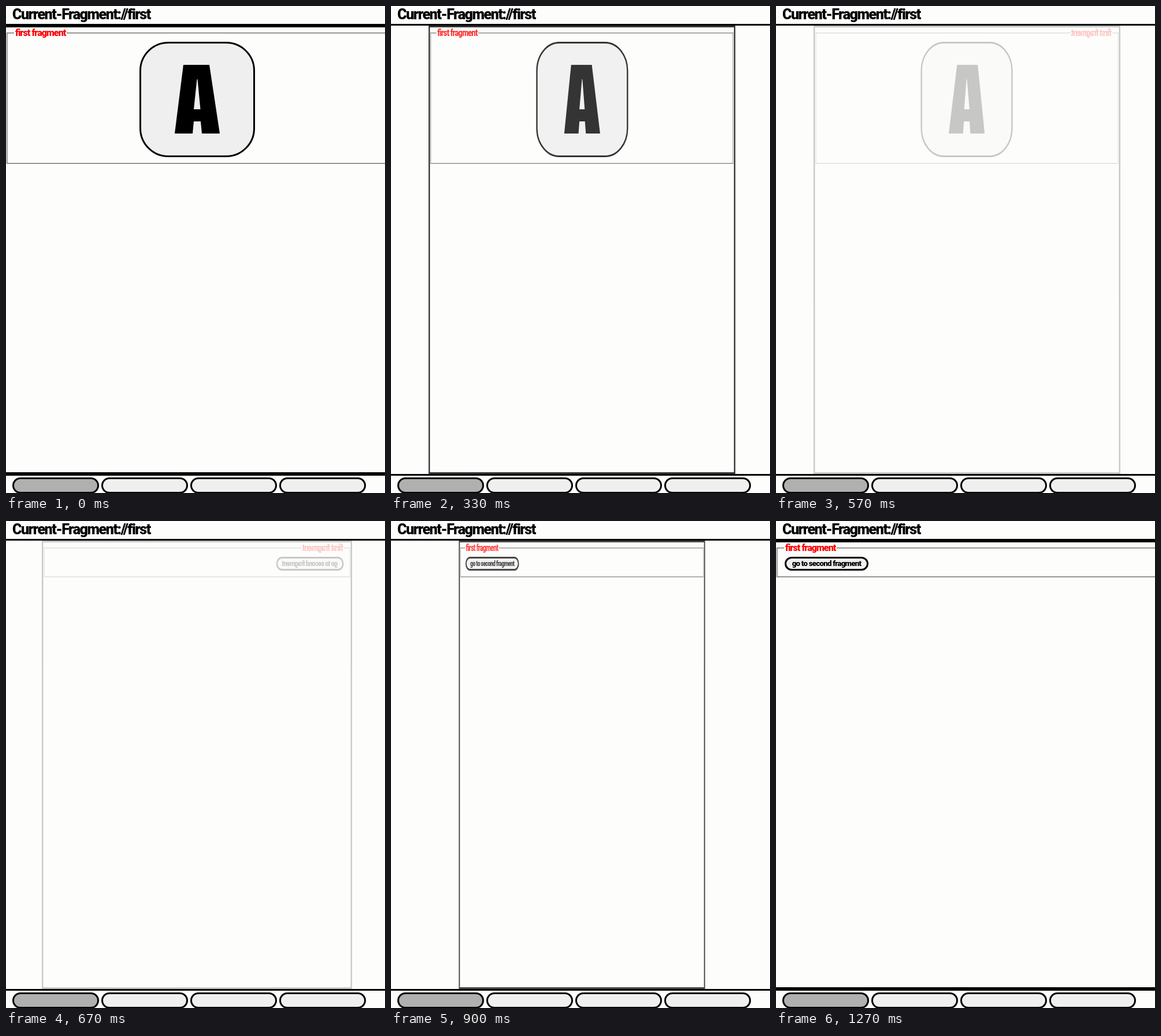
These frames come from a looping animation (656x844 px, 1.66 s). An HTML page:

```html
<!DOCTYPE html>
<html lang="en">
<head>
<meta charset="utf-8">
<title>Fragments</title>
<style>
  html, body { margin: 0; width: 100%; height: 100%; overflow: hidden; }
  body { position: relative; background: #fdfdfc; color: #000;
         font: 900 25px Roboto, sans-serif; white-space: nowrap; }
  div, svg { position: absolute; box-sizing: border-box; letter-spacing: -.058em; }
  .title { left: 11px; top: 0; line-height: 29px; }
  .line { left: 0; width: 100%; height: 3px; background: #000; }
  .button { border: 3px solid #000; background: #efefef; }
  .nav { top: 817px; width: 150px; height: 28px; border-radius: 14px; }
  .nav.on { background: #b0b0b0; }
  #card { left: -3px; top: 34px; width: 667px; height: 777px; border: 3px solid #000; }
  .field { left: 1px; top: 9px; width: 659px; border: 2px groove #c0c0c0; }
  .legend { left: 14px; top: 2px; padding: 0 2px; background: #fdfdfc; color: #f00;
            font-size: 16px; line-height: 16px; }
  .letter { left: 231px; top: 25px; width: 200px; height: 200px; border-radius: 50px; }
  .letter svg { left: -3px; top: -3px; }
  .go { left: 15px; top: 25px; width: 145px; height: 24px; border-radius: 12px;
        font-size: 13.33px; line-height: 18px; text-align: center; }
</style>
</head>
<body>
<div class="title">Current-Fragment://first</div>
<div class="line" style="top:31px"></div>
<div id="card">
  <div class="field" id="field"></div>
  <div class="legend">first fragment</div>
  <div class="button letter" id="letter">
    <svg width="200" height="200" role="img" aria-label="A">
      <path fill-rule="evenodd" d="M76 40H121L139 159H108L106 138H94L92 159H61ZM99.5 65L94 117H105.5L100.5 65Z"/>
    </svg>
  </div>
  <div class="button go" id="go">go to second fragment</div>
</div>
<div class="line" style="top:811px"></div>
<div class="button nav on" style="left:11px"></div>
<div class="button nav" style="left:165px"></div>
<div class="button nav" style="left:319px"></div>
<div class="button nav" style="left:473px"></div>
<script>
const LOOP = 1660, START = 34, OUT = 834, SWAP = 595, BACK = 518;
const [card, field, letter, go] = ['card', 'field', 'letter', 'go'].map(id => document.getElementById(id));

function easeInOut(p, power) {
  p = Math.min(1, Math.max(0, p));
  return p < .5 ? (2 * p) ** power / 2 : 1 - (2 - 2 * p) ** power / 2;
}

const flipOut = t => easeInOut((t - START) / OUT, 2.6);

// The flip turns back before it is complete, showing the new content.
const flip = t => t < SWAP
  ? flipOut(t)
  : flipOut(SWAP) * (1 - easeInOut((t - SWAP) / BACK, 2));

function draw(now) {
  const t = now % LOOP, turn = flip(t), swapped = t >= SWAP;
  card.style.transform = `scaleX(${Math.cos(turn * Math.PI)})`;
  card.style.opacity = 1 - turn;
  field.style.height = swapped ? '52px' : '228px';
  letter.style.display = swapped ? 'none' : '';
  go.style.display = swapped ? '' : 'none';
  requestAnimationFrame(() => draw(performance.now() - begin));
}

const begin = performance.now();
draw(0);
</script>
</body>
</html>
```
